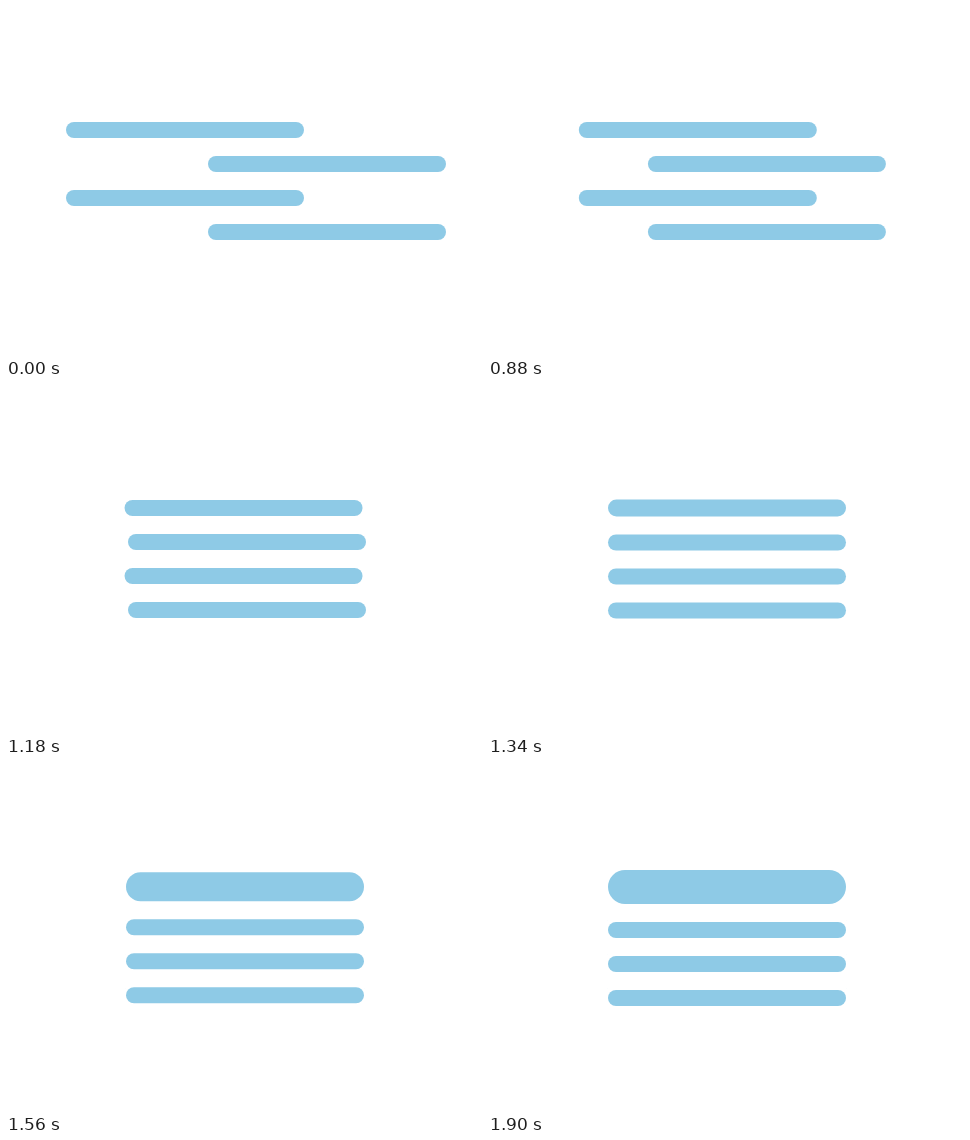
Animation of 476 by 350 pixels, one loop 3.9 s. Source, as an HTML page:

```html
<!DOCTYPE html>
<html lang="en">
<head>
<meta charset="utf-8">
<title>Bars</title>
<style>
  html, body { margin: 0; width: 100%; height: 100%; overflow: hidden; background: #fff; }
  svg { display: block; width: 100%; height: 100%; }
</style>
</head>
<body>
<svg viewBox="0 0 476 350" fill="#8ecae6">
  <rect width="238"/>
  <rect width="238"/>
  <rect width="238"/>
  <rect width="238"/>
</svg>
<script>
const LOOP = 3900, STEP = 20, DURATION = 600;
const SLIDE_AT = 700, GROW_AT = 1300;
const bars = document.querySelectorAll('rect');

const bezier = (a, b, s) => 3 * a * s * (1 - s) ** 2 + 3 * b * s * s * (1 - s) + s ** 3;

// cubic-bezier(.25, .1, .25, 1), solved by bisection
function ease(x) {
  if (x <= 0) return 0;
  if (x >= 1) return 1;
  let lo = 0, hi = 1;
  for (let i = 0; i < 30; i++) {
    const mid = (lo + hi) / 2;
    if (bezier(0.25, 0.25, mid) < x) lo = mid; else hi = mid;
  }
  return bezier(0.1, 1, lo);
}

const mix = (a, b, p) => a + (b - a) * p;

function draw(time) {
  const t = Math.floor((time % LOOP) / STEP) * STEP;
  const slide = ease((t - SLIDE_AT) / DURATION);
  const grow = ease((t - GROW_AT) / DURATION);
  bars.forEach((bar, i) => {
    const y = 116 + 34 * i;
    const h = i ? 16 : mix(16, 34, grow);
    bar.setAttribute('x', mix(i % 2 ? 202 : 60, 120, slide));
    bar.setAttribute('y', y + (i ? 10 : -8) * grow);
    bar.setAttribute('height', h);
    bar.setAttribute('rx', h / 2);
  });
}

const start = performance.now();
function tick() {
  draw(performance.now() - start);
  requestAnimationFrame(tick);
}
tick();
</script>
</body>
</html>
```
